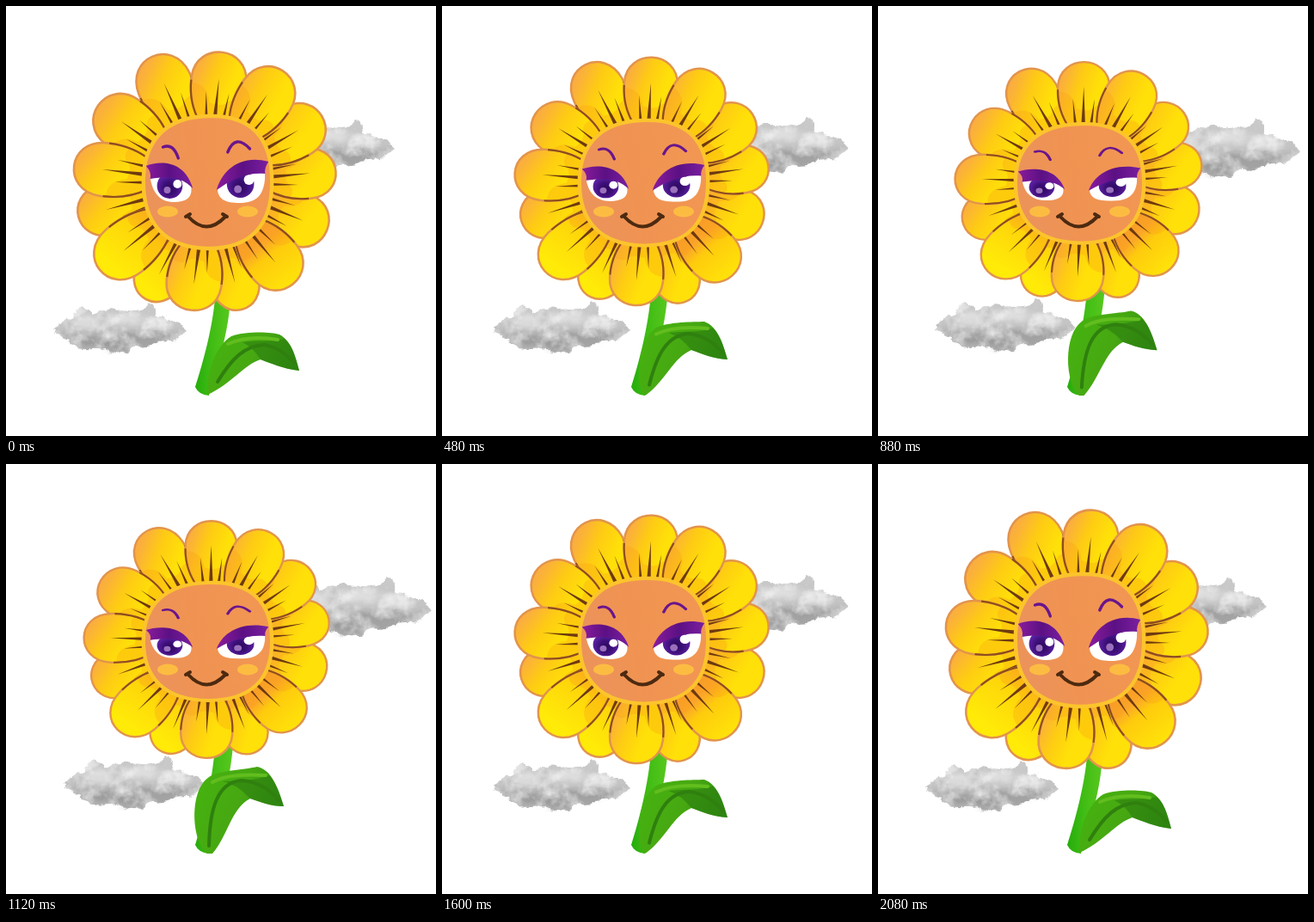
An HTML page for the animation above (2.16 s loop, 500 px wide and 500 px high).

```html
<!DOCTYPE html>
<html lang="en">
<head>
<meta charset="utf-8">
<title>Sunflower</title>
<style>
  html, body { margin: 0; width: 100%; height: 100%; overflow: hidden; background: #fff; }
  svg { display: block; width: 100vw; height: 100vh; }
</style>
</head>
<body>
<svg viewBox="0 0 500 500" xmlns="http://www.w3.org/2000/svg">
  <defs>
    <linearGradient id="warm" x2="1" y2=".6">
      <stop offset="0" stop-color="#f7a352"/><stop offset=".22" stop-color="#fbb238"/>
      <stop offset=".45" stop-color="#fecb14"/><stop offset=".75" stop-color="#ffe008"/>
    </linearGradient>
    <linearGradient id="sun" x1=".9" y1="0" x2=".25" y2=".8">
      <stop offset="0" stop-color="#f9a425"/><stop offset=".45" stop-color="#fed60a"/>
      <stop offset="1" stop-color="#ffea08"/>
    </linearGradient>
    <linearGradient id="dusk" x2=".75" y2="1">
      <stop offset="0" stop-color="#ee8a3c"/><stop offset=".42" stop-color="#fba52a"/>
      <stop offset=".58" stop-color="#fecb0d"/><stop offset="1" stop-color="#ffe409"/>
    </linearGradient>
    <linearGradient id="tone" x2="1" y2="-.2">
      <stop offset="0" stop-color="#ec935a"/><stop offset=".3" stop-color="#f09352"/>
      <stop offset="1" stop-color="#f29753"/>
    </linearGradient>
    <linearGradient id="lid" x2="1">
      <stop offset="0" stop-color="#8a1c9c"/><stop offset=".5" stop-color="#5c1084"/>
      <stop offset="1" stop-color="#7a1fa0"/>
    </linearGradient>
    <radialGradient id="iris" cy=".6">
      <stop offset="0" stop-color="#2c0a5c"/><stop offset=".5" stop-color="#3c0f78"/>
      <stop offset="1" stop-color="#5b1fa0"/>
    </radialGradient>
    <linearGradient id="stalk" x2="1">
      <stop offset="0" stop-color="#25ac0c"/><stop offset=".45" stop-color="#3fbc14"/>
      <stop offset="1" stop-color="#58c81e"/>
    </linearGradient>
    <linearGradient id="blade" x2="1" y2=".4">
      <stop offset="0" stop-color="#45b40f"/><stop offset=".55" stop-color="#47a812"/>
      <stop offset="1" stop-color="#2f8f12"/>
    </linearGradient>
    <linearGradient id="mist" x2="0" y2="1">
      <stop offset="0" stop-color="#cacaca"/><stop offset=".5" stop-color="#c4c4c4"/>
      <stop offset=".8" stop-color="#a6a6a6"/><stop offset="1" stop-color="#b8b8b8"/>
    </linearGradient>
    <filter id="soft"><feGaussianBlur stdDeviation="3"/></filter>
    <filter id="fluff" x="-10%" y="-20%" width="120%" height="140%" color-interpolation-filters="sRGB">
      <feTurbulence type="fractalNoise" baseFrequency=".06" numOctaves="4" seed="8" result="noise"/>
      <feDisplacementMap in="SourceGraphic" in2="noise" scale="11" xChannelSelector="R" yChannelSelector="G" result="puff"/>
      <feColorMatrix in="noise" values="0 0 0 0 1  0 0 0 0 1  0 0 0 0 1  1.6 0 0 0 -.65" result="glow"/>
      <feComposite in="glow" in2="puff" operator="in" result="lit"/>
      <feMerge><feMergeNode in="puff"/><feMergeNode in="lit"/></feMerge>
    </filter>
    <clipPath id="leftEye"><path d="M167 200C180 195 202 196 215 210C217 222 210 228 195 228C179 228 170 218 167 200Z"/></clipPath>
    <clipPath id="rightEye"><path d="M246 213C262 199 285 192 302 194C302 221 291 229 272 229C255 229 247 225 246 213Z"/></clipPath>
    <g id="cloud" filter="url(#fluff)">
      <path fill="url(#mist)" d="M0 31Q9 27 16 18Q27 16 33 5Q40 8 44 15Q58 5 70 8Q84 6 95 9Q104 9 110 0Q117 4 119 14Q130 12 136 21Q149 25 155 32Q148 43 138 46Q118 46 107 49Q94 50 86 58Q70 59 60 52Q45 56 27 53Q17 50 19 42Q4 38 0 31Z"/>
      <g fill="#858585" opacity=".45" filter="url(#soft)">
        <ellipse cx="55" cy="42" rx="32" ry="6"/><ellipse cx="105" cy="39" rx="27" ry="5"/>
        <ellipse cx="76" cy="51" rx="14" ry="4"/>
      </g>
      <g fill="#f0f0f0" opacity=".6" filter="url(#soft)">
        <ellipse cx="38" cy="23" rx="16" ry="6"/><ellipse cx="82" cy="19" rx="20" ry="6"/>
        <ellipse cx="116" cy="24" rx="14" ry="6"/>
      </g>
    </g>
  </defs>

  <rect width="500" height="500" fill="#fff"/>
  <use id="cloudRight" href="#cloud"/>
  <use id="cloudLeft" href="#cloud"/>
  <path id="stem" fill="url(#stalk)"/>
  <path id="leaf" fill="url(#blade)"/>
  <path id="fold" fill="#2c7d10" opacity=".6"/>
  <path id="rib" fill="none" stroke="#2f800e" stroke-width="4" stroke-linecap="round"/>
  <path id="gleam" fill="none" stroke="#62bd1e" stroke-width="4" stroke-linecap="round"/>
  <g id="ring"></g>
  <path id="skin" fill="url(#tone)" stroke="#fcc42c" stroke-width="4.5" d="M235 128C285 126 310 153 310 204C310 254 286 282 235 282C184 281 159 253 159 204C159 156 186 129 235 128Z"/>
  <g id="brows" fill="none" stroke="#69158c" stroke-width="3.4" stroke-linecap="round">
    <path d="M182 164Q194 159 200 177"/><path d="M258 170Q267 148 284 166"/>
  </g>
  <g id="eyes">
    <g clip-path="url(#leftEye)">
      <path fill="#fff" d="M160 190H220V232H160Z"/>
      <circle cx="190" cy="209" r="15" fill="url(#iris)"/>
      <circle cx="199" cy="207" r="5" fill="#fff"/><circle cx="187" cy="214" r="4" fill="#9a70bd"/>
    </g>
    <g clip-path="url(#rightEye)">
      <path fill="#fff" d="M240 185H306V232H240Z"/>
      <circle cx="273" cy="207" r="16" fill="url(#iris)"/>
      <circle cx="283" cy="202" r="6" fill="#fff"/><circle cx="270" cy="213" r="4.5" fill="#9a70bd"/>
    </g>
    <g fill="url(#lid)">
      <path d="M162 186C177 180 207 178 217 212C203 197 186 198 167 201Q169 193 162 186Z"/>
      <path d="M245 214C251 192 272 172 306 181Q301 188 302 195C281 193 263 201 245 214Z"/>
    </g>
  </g>
  <g fill="#fcbc42"><ellipse cx="188" cy="239" rx="12" ry="6.5"/><ellipse cx="281" cy="239" rx="12" ry="6.5"/></g>
  <path fill="none" stroke="#4d2a10" stroke-width="4" stroke-linecap="round" d="M212 245Q233 268 255 245M209 245L214 242M252 242L257 245"/>
</svg>
<script>
const STEP = 80, COUNT = 27, CENTER = [235, 205];
const $ = id => document.getElementById(id);
const set = (id, name, value) => $(id).setAttribute(name, value);

// Petals in painting order: angle in degrees, tip radius, half width, fill.
const petals = [
  [165, 156, 30, 'warm'], [118, 154, 28, 'sun'], [75, 153, 28, 'warm'],
  [22, 149, 31, 'warm'], [-5, 149, 29, 'warm'], [-30, 153, 31, 'warm'],
  [246, 160, 32, 'warm'], [215, 156, 32, 'warm'], [187, 157, 31, 'warm'],
  [-84, 152, 32, 'warm'], [-56, 156, 32, 'warm'], [141, 162, 32, 'sun'],
  [50, 154, 32, 'dusk'], [98, 150, 32, 'warm']
];

// Turns a path written along the petal axis into stage coordinates.
function polarPath(template, [angle, radius, half]) {
  const a = angle * Math.PI / 180, c = Math.cos(a), s = Math.sin(a);
  return template.replace(/(-?[\d.]+),(-?[\d.]+)/g, (_, along, across) => {
    const x = 70 + (along - 70) * (radius - 70) / 79, y = across * half / 31;
    return (CENTER[0] + x * c - y * s).toFixed(1) + ' ' + (CENTER[1] + x * s + y * c).toFixed(1);
  });
}

const shapes = {
  body: 'M68,-16 C83,-27 102,-32 119,-31 C159,-29 159,29 119,31 C102,32 83,27 68,16 Z',
  shade: 'M70,-16 C85,-26 96,-30 112,-30 Q112,-12 92,-8 Q88,4 92,10 Q100,18 94,27 Q82,23 70,16 Z',
  sides: 'M68,-16 C83,-27 100,-31 115,-31 M68,16 C83,27 100,31 115,31',
  creases: 'M72,-2.4 L119,0 L72,2.4 Z M72,-11 L104,-13 L72,-7.5 Z M72,7.5 L104,13 L72,11 Z'
};

function buildRing() {
  const draw = (petal, shape, style) => `<path d="${polarPath(shapes[shape], petal)}" ${style}/>`;
  $('ring').innerHTML = '<circle cx="235" cy="205" r="86" fill="#f0a024"/>' + petals.map(p =>
    draw(p, 'body', `fill="url(#${p[3]})" stroke="#e2944c" stroke-width="2.6"`) +
    draw(p, 'shade', 'fill="#f9a018" opacity=".32"') +
    draw(p, 'sides', 'fill="none" stroke="#8d4d1c" stroke-width="2.2"') +
    draw(p, 'creases', 'fill="#6e3a10"')
  ).join('');
}

// Blends two paths of the same structure.
function blend(from, to, u) {
  const ends = to.match(/-?[\d.]+/g);
  let i = 0;
  return from.replace(/-?[\d.]+/g, n => (+n + (ends[i++] - n) * u).toFixed(2));
}

const plant = {
  stem: ['M243 340C240 375 229 415 220 443Q224 452 236 453C241 430 258 390 261 340Z',
         'M243 328C240 370 229 415 220 443Q224 452 236 453C241 430 258 390 264 328Z'],
  leaf: ['M234 452C233 425 244 395 262 384C280 378 308 379 318 382C332 390 336 405 341 424C322 422 307 415 296 411C275 418 262 440 234 452Z',
         'M234 453C216 440 212 380 236 364C248 356 275 356 292 352C308 355 316 375 323 398C308 398 295 393 284 389C262 400 258 432 240 453Z'],
  fold: ['M275 391C295 388 310 391 324 387C332 394 336 405 341 424C322 422 307 415 296 411Q288 398 275 391Z',
         'M252 369C268 368 288 369 306 362C314 370 318 382 323 398C308 398 295 393 284 389Q268 372 252 369Z'],
  rib: ['M246 437C263 409 278 395 300 394Q320 397 335 415', 'M236 444C237 400 246 370 274 368Q300 370 317 391'],
  gleam: ['M258 393C276 385 298 385 316 388', 'M240 370C256 361 278 361 302 362']
};

// Values at steps 0, 4, 8 and 12; the last slope carries on to the turn.
function track(k, ...v) {
  const i = Math.min(2, Math.floor(k));
  return v[i] + (v[i + 1] - v[i]) * (k - i);
}

function placeCloud(id, x, y, size) {
  set(id, 'transform', `translate(${x} ${y}) scale(${size}) translate(-155 -32)`);
}

// Scales a part of the face about a fixed height.
function squash(id, y, sy, dy = 0) {
  set(id, 'transform', `translate(235 ${y + dy}) scale(.99 ${sy}) translate(-235 ${-y})`);
}

function render(time) {
  const step = Math.floor(time / STEP) % COUNT;
  const k = Math.min(step, COUNT - 1 - step) / 4, u = k / 3;

  placeCloud('cloudLeft', track(k, 210, 214, 224, 232), track(k, 377, 377, 375, 373), 1 + .065 * u);
  placeCloud('cloudRight', track(k, 452, 466, 480, 495), track(k, 165, 163, 166, 169), 1.04 + .15 * u);
  for (const id in plant) set(id, 'd', blend(...plant[id], u));

  set('ring', 'transform', `translate(${231 + 3 * u} ${204 + .5 * u}) ` +
    `scale(${1 - .062 * u} ${1 - .087 * u}) rotate(${-5.6 * u}) translate(-231 -204)`);
  squash('skin', 205, 1 - .11 * u, 1.5 * u);
  squash('brows', 184, 1 - .3 * u);
  squash('eyes', 218, 1 - .22 * u);
}

buildRing();
const start = performance.now();
function tick(now) {
  render(Math.max(0, now - start));
  requestAnimationFrame(tick);
}
render(0);
requestAnimationFrame(tick);
</script>
</body>
</html>
```
